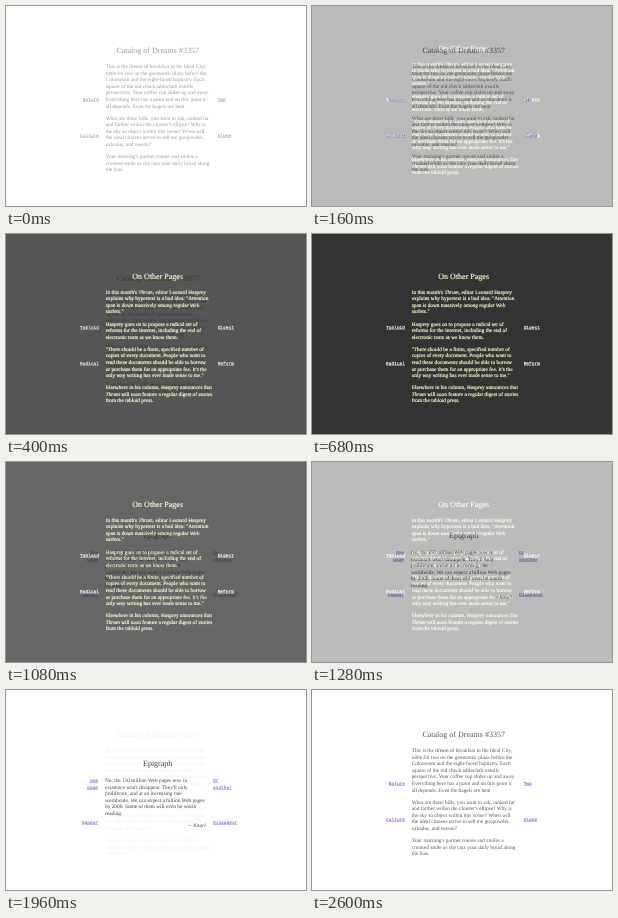
An HTML page for the animation above (2.88 s loop, 300 by 200 pixels).

```html
<!DOCTYPE html>
<html lang="en">
<head>
<meta charset="utf-8">
<title>Three pages</title>
<style>
html, body {
  margin: 0;
  width: 100%;
  height: 100%;
  overflow: hidden;
  background: #fff;
}
/* Laid out at three times the stage size, then scaled down. */
.book {
  position: absolute;
  left: 0;
  top: 0;
  width: 900px;
  height: 600px;
  overflow: hidden;
  transform: scale(.333334);
  transform-origin: 0 0;
  font: 16px/19.6px "Liberation Serif", "Times New Roman", serif;
  text-rendering: geometricPrecision;
}
.page {
  position: absolute;
  inset: 0;
  background: #fff;
  color: #333;
  --link: #33c;
}
h1, .text, .link { position: absolute; margin: 0; white-space: pre; }
h1 {
  left: 155px;
  width: 600px;
  top: calc(var(--title) - 14px);
  font-size: 24px;
  line-height: 28px;
  font-weight: normal;
  text-align: center;
}
.text { left: 299px; width: 302px; top: var(--top); }
p { margin: 0 0 17.3px; }
.by { text-align: right; }
.link {
  top: calc(var(--y) - 9.8px);
  color: var(--link);
  font-family: "Liberation Mono", "Courier New", monospace;
  font-size: 13.5px;
  text-decoration: underline;
}
.l { right: 621px; text-align: right; }
.r { left: 635px; }

.dreams { --title: 134px; --top: 173px; color: #555; animation: dreams 2880ms infinite; }
.other {
  --title: 127px;
  --top: 165px;
  --link: #fff;
  background: #333;
  color: #ffc;
  -webkit-text-stroke: .5px;
  animation: other 2880ms infinite;
}
.epigraph { --title: 222px; --top: 262px; animation: epigraph 2880ms infinite; }
.epigraph .text { left: 297px; }
.epigraph .l { right: 624px; }
.epigraph .r { left: 621px; }

/* Each 960 ms turn is a 480 ms dissolve in twelve steps, then a rest. */
@keyframes dreams {
  0% { opacity: .6; filter: grayscale(1); animation-timing-function: step-end; }
  1.3888%, 100% { opacity: 1; filter: none; }
}
@keyframes other {
  0% { opacity: 0; animation-timing-function: steps(12); }
  16.6666% { opacity: 1; animation-timing-function: step-end; }
  55%, 100% { opacity: 0; }
}
@keyframes epigraph {
  0% { opacity: 0; animation-timing-function: step-end; }
  33.3333% { opacity: 0; animation-timing-function: steps(12); }
  50% { opacity: 1; animation-timing-function: step-end; }
  66.6666% { opacity: 1; animation-timing-function: steps(12); }
  83.3333%, 100% { opacity: 0; }
}
</style>
</head>
<body>
<main class="book">
<section class="page dreams">
<h1>Catalog of Dreams #3357</h1>
<div class="text"><p>This is the dream of breakfast in the Ideal City,
table for two on the geomantic plaza before the
Colosseum and the eight-faced baptistry. Each
square of the red check tablecloth extolls
perspective. Your coffee cup slides up and away.
Everything here has a point and on this point it
all depends. Even the bagels are bent</p><p>What are those hills, you want to ask, ranked far
and farther within the cloister's ellipse? Why is
the sky so object within this scene? When will
the ideal citizens arrive to sell me gunpowder,
calculus, and reason?</p><p>Your morning's partner rouses and smiles a
crooked smile as she cuts your daily bread along
the bias.</p></div>
<span class="link l" style="--y:283px">Nature</span>
<span class="link r" style="--y:283px">Two</span>
<span class="link l" style="--y:391px">Culture</span>
<span class="link r" style="--y:391px">Alone</span>
</section>

<section class="page other">
<h1>On Other Pages</h1>
<div class="text"><p>In this month's <i>Thrum</i>, editor Leonard Hasprey
explains why hypertext is a bad idea: "Attention
span is down massively among regular Web
surfers."</p><p>Hasprey goes on to propose a radical set of
reforms for the Internet, including the end of
electronic texts as we know them.</p><p>"There should be a finite, specified number of
copies of every document. People who want to
read these documents should be able to borrow
or purchase them for an appropriate fee. It's the
only way writing has ever made sense to me."</p><p>Elsewhere in his column, Hasprey announces that
<i>Thrum</i> will soon feature a regular digest of stories
from the tabloid press.</p></div>
<span class="link l" style="--y:283px">Tabloid</span>
<span class="link r" style="--y:283px">Digest</span>
<span class="link l" style="--y:391px">Radical</span>
<span class="link r" style="--y:391px">Reform</span>
</section>

<section class="page epigraph">
<h1>Epigraph</h1>
<div class="text"><p>No, the 150 million Web pages now in
existence won't disappear. They'll only
proliferate, and at an increasing rate
worldwide. We can expect a billion Web pages
by 2000. Some of them will even be worth
reading.</p><p class="by">-- <i>Knurl</i></p></div>
<span class="link l" style="--y:274px">One
page</span>
<span class="link r" style="--y:274px">Or
another</span>
<span class="link l" style="--y:400px">Appear</span>
<span class="link r" style="--y:400px">Disappear</span>
</section>
</main>
</body>
</html>
```
